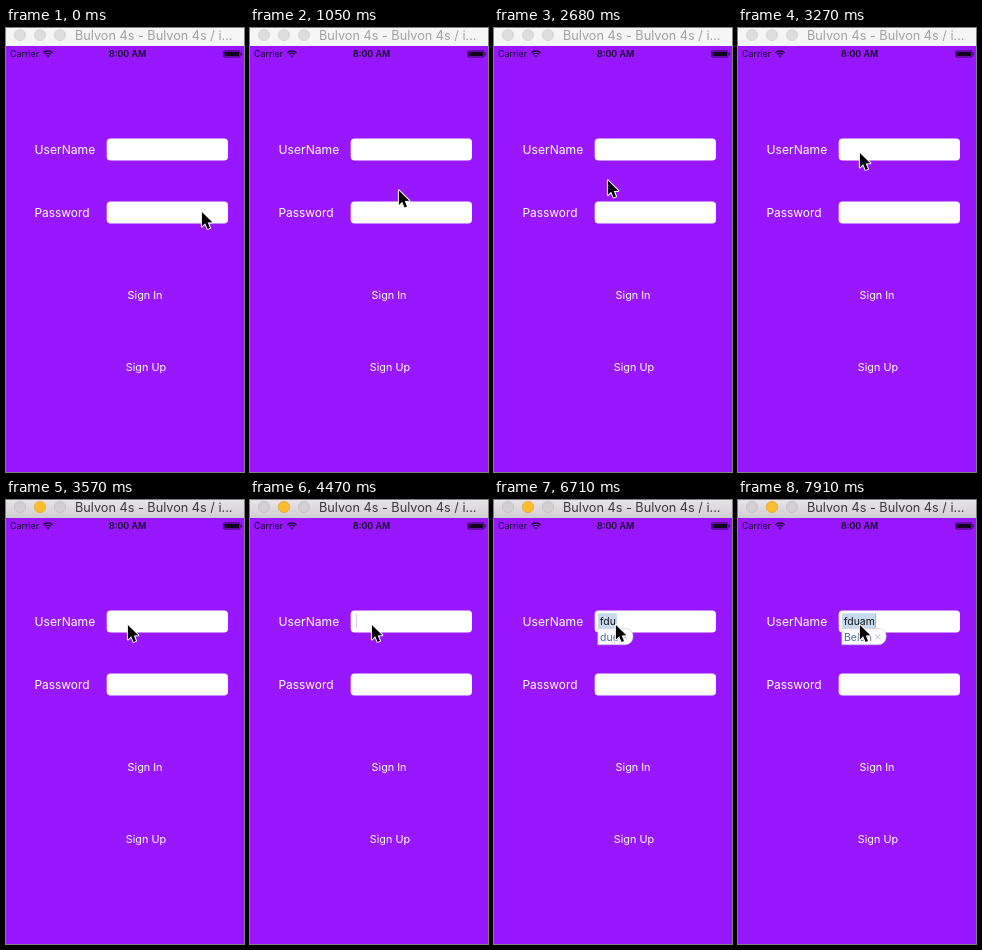
Recreate the animation shown at these times as an HTML page with a canvas. Size 238 px wide and 444 px high, loop 8000 ms.

```html
<!DOCTYPE html>
<html lang="en">
<head>
<meta charset="utf-8">
<title>Sign in form</title>
<style>
  html, body { margin: 0; width: 100%; height: 100%; overflow: hidden; background: #9817ff; }
  canvas { display: block; width: 238px; height: 444px; }
</style>
</head>
<body>
<canvas id="stage"></canvas>
<script>
const W = 238, H = 444, LOOP = 8000;
const canvas = document.getElementById('stage');
const ctx = canvas.getContext('2d');
const ratio = window.devicePixelRatio || 1;
canvas.width = W * ratio;
canvas.height = H * ratio;

// [start ms, x, y] of the pointer; null hides it
const pointerPath = [
  [0, 195, 182.5], [150, 191, 175], [300, 179, 149], [450, 165, 127], [600, 160, 119.5],
  [1050, 148, 161], [1200, 87, 427], [1340, null],
  [1940, 111, 382.5], [2090, 105, 253], [2240, 102, 214], [2390, 103, 188],
  [2530, 107, 168], [2680, 113, 151], [2830, 118, 138], [2980, 121, 130],
  [3130, 121, 127], [3270, 121, 123.5]
];

// [start ms, typed text, caret opacity, suggestion]
const typing = [
  [0, '', 0], [3870, '', 1], [4470, '', .3], [4620, '', 0],
  [4920, '', 1], [5360, '', .3], [5510, '', 0],
  [5810, 'f', 1], [5960, 'fdu', 1],
  [6260, 'fdu', 1, 'due'], [6560, 'fdu', .3, 'due'], [6710, 'fdu', 0, 'due'],
  [7160, 'fduam', 1], [7310, 'fduam', 1, 'Belun'], [7910, 'fduam', .3, 'Belun']
];

const current = (steps, t) => steps.filter(s => s[0] <= t).pop();

function text(str, x, y, size, color, weight = 400) {
  ctx.font = `${weight} ${size}px Inter, "Liberation Sans", sans-serif`;
  ctx.fillStyle = color;
  ctx.fillText(str, x, y);
  return ctx.measureText(str).width;
}

function box(x, y, w, h, r, color) {
  ctx.beginPath();
  ctx.roundRect(x, y, w, h, r);
  ctx.fillStyle = color;
  ctx.fill();
}

function titleBar(active) {
  const shade = ctx.createLinearGradient(0, 0, 0, 18);
  shade.addColorStop(0, active ? '#e6e4e6' : '#f6f6f6');
  shade.addColorStop(1, active ? '#d0ced0' : '#f6f6f6');
  ctx.fillStyle = shade;
  ctx.fillRect(0, 0, W, 18);
  [14, 34, 54].forEach((x, i) => {
    const lit = active && i === 1;
    ctx.beginPath();
    ctx.arc(x, 7, 5.6, 0, 7);
    ctx.fillStyle = lit ? '#fdbd2f' : active ? '#d2d0d2' : '#dddddd';
    ctx.fill();
    ctx.lineWidth = .7;
    ctx.strokeStyle = lit ? '#e0a127' : active ? '#bcbabc' : '#d0d0d0';
    ctx.stroke();
  });
  text('Bulvon 4s - Bulvon 4s / i...', 69, 12, 12.7, active ? '#3b393b' : '#a2a2a2');
}

function statusBar() {
  const ink = '#13031f';
  text('Carrier', 4, 29, 8.9, ink);
  text('8:00 AM', 103, 29, 8.9, ink, 600);

  ctx.strokeStyle = ctx.fillStyle = ink;
  ctx.lineWidth = 1.3;
  for (const r of [3.7, 6.2]) {
    ctx.beginPath();
    ctx.arc(42, 29, r, -Math.PI * .76, -Math.PI * .24);
    ctx.stroke();
  }
  ctx.beginPath();
  ctx.moveTo(42, 29.5);
  ctx.arc(42, 29.3, 2, -Math.PI * .76, -Math.PI * .24);
  ctx.fill();

  ctx.beginPath();
  ctx.roundRect(217.5, 22.8, 16.6, 6.4, 1.3);
  ctx.lineWidth = .6;
  ctx.stroke();
  box(218.4, 23.7, 14.8, 4.6, .6, ink);
  box(234.9, 24.8, 1.2, 2.4, [0, 1, 1, 0], ink);
}

function form() {
  text('UserName', 28.5, 126, 12.1, '#fff');
  text('Password', 28.5, 189, 11.9, '#fff');
  box(100.7, 110.5, 121.3, 22, 4, '#fff');
  box(100.7, 173.5, 121.3, 22, 4, '#fff');
  text('Sign In', 121.6, 271, 10.8, '#fff');
  text('Sign Up', 119.8, 342.5, 10.8, '#fff');
}

function popup(word) {
  ctx.font = '400 10.5px Inter, "Liberation Sans", sans-serif';
  const w = ctx.measureText(word).width + 16.5;
  const corners = [0, 7, 8, 0];
  box(103.8, 128.6, w, 16.2, corners, '#fff');
  ctx.lineWidth = .5;
  ctx.strokeStyle = '#b9b4cc';
  ctx.stroke();
  text(word, 106, 140.7, 10.5, '#4d6d9e');
  const x = 103.8 + w - 8.5, y = 137;
  ctx.beginPath();
  ctx.moveTo(x - 2.4, y - 2.4);
  ctx.lineTo(x + 2.4, y + 2.4);
  ctx.moveTo(x + 2.4, y - 2.4);
  ctx.lineTo(x - 2.4, y + 2.4);
  ctx.lineWidth = .9;
  ctx.strokeStyle = '#b4b4b8';
  ctx.stroke();
}

function entry([, typed, caret, word]) {
  ctx.font = '400 10.4px Inter, "Liberation Sans", sans-serif';
  const w = ctx.measureText(typed).width;
  if (word) {
    box(104, 113.3, w + 3, 15.2, 1, '#c5daee');
    popup(word);
  }
  text(typed, 105.8, 125, 10.4, '#151515');
  ctx.globalAlpha = caret;
  ctx.fillStyle = '#4468dc';
  ctx.fillRect(106 + Math.round(w), 114, 1, 14);
  ctx.globalAlpha = 1;
}

function pointer([, x, y]) {
  if (x === null) return;
  ctx.save();
  ctx.translate(x + .9, y + 1.4);
  ctx.beginPath();
  ctx.moveTo(0, 0);
  ctx.lineTo(0, 14.6);
  ctx.lineTo(3.3, 11.4);
  ctx.lineTo(5.7, 17);
  ctx.lineTo(8.1, 16);
  ctx.lineTo(5.8, 10.5);
  ctx.lineTo(10.4, 10.4);
  ctx.closePath();
  ctx.lineWidth = 2;
  ctx.lineJoin = 'round';
  ctx.strokeStyle = '#fff';
  ctx.stroke();
  ctx.fillStyle = '#000';
  ctx.fill();
  ctx.restore();
}

function draw(t) {
  ctx.setTransform(ratio, 0, 0, ratio, 0, 0);
  ctx.fillStyle = '#9817ff';
  ctx.fillRect(0, 0, W, H);
  titleBar(t >= 3570);
  statusBar();
  form();
  entry(current(typing, t));
  pointer(current(pointerPath, t));
}

let start;
function frame(now) {
  start ??= now;
  draw(Math.max(0, now - start) % LOOP);
  requestAnimationFrame(frame);
}
draw(0);
requestAnimationFrame(frame);
</script>
</body>
</html>
```
